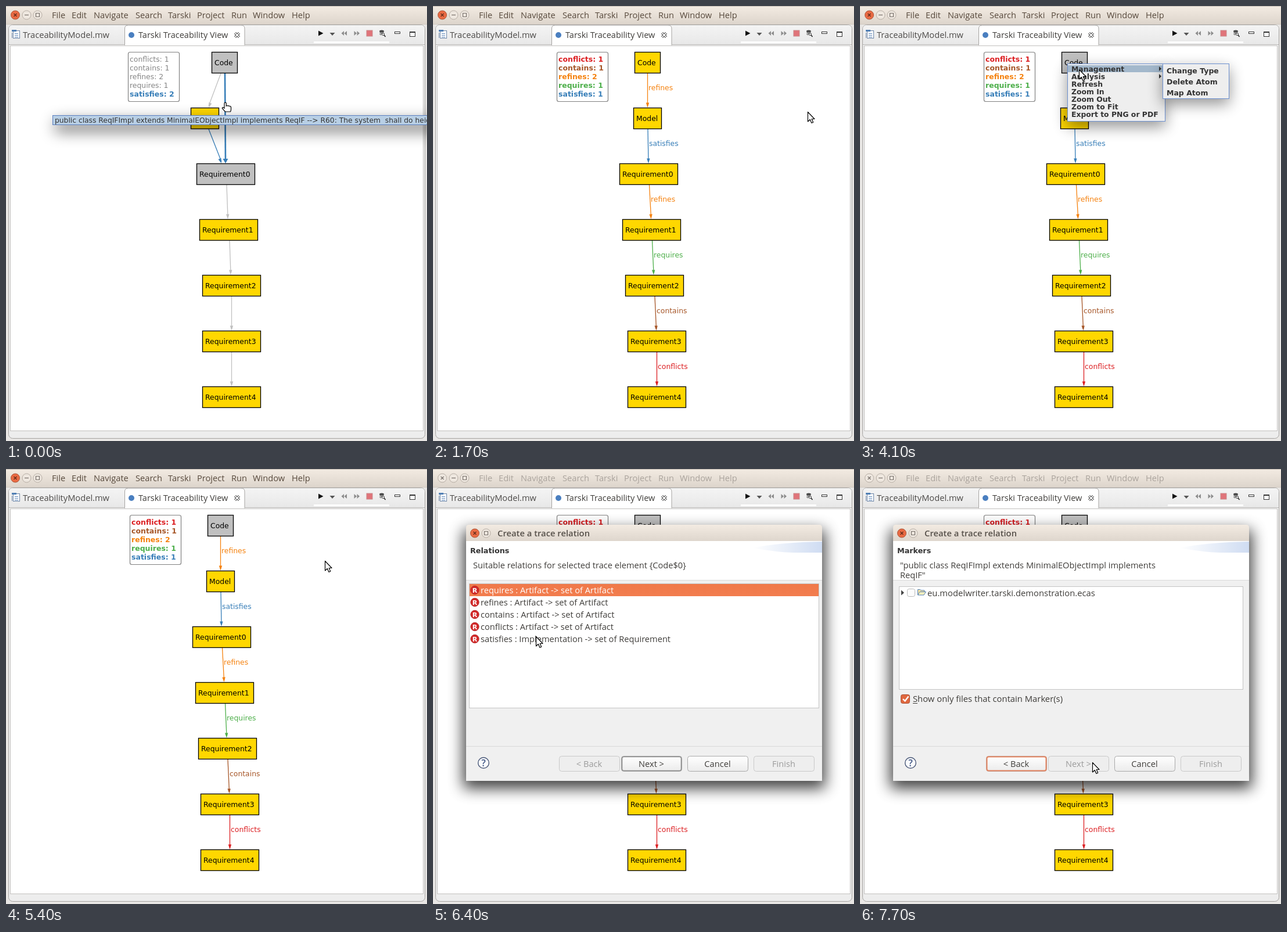
These frames come from a looping animation (725x749 px, 8000 ms). An HTML page:

```html
<!DOCTYPE html>
<html lang="en">
<head>
<meta charset="utf-8">
<title>Traceability view</title>
<style>
html, body { margin: 0; width: 100%; height: 100%; overflow: hidden; background: #e9e7e5; }
svg { display: block; width: 725px; height: 749px; }
text { white-space: pre; }
.dv { font: 12.4px "DejaVu Sans", sans-serif; }
.db { font: bold 12.5px "DejaVu Sans", sans-serif; }
.ui { font: 14.65px "Open Sans", "Noto Sans", sans-serif; }
.ti { font: 600 14.8px "Open Sans", "Noto Sans", sans-serif; }
.mid { text-anchor: middle; }
</style>
</head>
<body>
<svg id="stage" viewBox="0 0 725 749" xmlns="http://www.w3.org/2000/svg">
  <defs>
    <linearGradient id="bar" x2="0" y2="1"><stop stop-color="#f3ebe2"/><stop offset="1" stop-color="#ddd5cc"/></linearGradient>
    <linearGradient id="tabs" x2="0" y2="1"><stop stop-color="#f4f4f4"/><stop offset="1" stop-color="#e8e8e8"/></linearGradient>
    <linearGradient id="row" x2="0" y2="1"><stop stop-color="#f0794a"/><stop offset="1" stop-color="#f27d4e"/></linearGradient>
    <linearGradient id="btn" x2="0" y2="1"><stop stop-color="#ffffff"/><stop offset="1" stop-color="#ebebeb"/></linearGradient>
    <linearGradient id="sky"><stop stop-color="#fff"/><stop offset="1" stop-color="#cfdcf2"/></linearGradient>
    <filter id="soft" filterUnits="userSpaceOnUse" x="-80" y="0" width="980" height="749"><feGaussianBlur stdDeviation="13"/></filter>
  </defs>
</svg>
<script>
const NS = 'http://www.w3.org/2000/svg';
const stage = document.getElementById('stage');

function el(parent, tag, attrs) {
  const e = document.createElementNS(NS, tag);
  for (const k in attrs) e.setAttribute(k, attrs[k]);
  parent.appendChild(e);
  return e;
}
const group = (p, attrs = {}) => el(p, 'g', attrs);
const rect = (p, x, y, width, height, fill, more = {}) => el(p, 'rect', { x, y, width, height, fill, ...more });
const disc = (p, cx, cy, r, fill, more = {}) => el(p, 'circle', { cx, cy, r, fill, ...more });
const path = (p, d, stroke, more = {}) => el(p, 'path', { d, stroke, fill: 'none', ...more });
const fillPath = (p, d, fill, more = {}) => el(p, 'path', { d, fill, ...more });
function label(p, x, y, str, cls, fill, more = {}) {
  const e = el(p, 'text', { x, y, class: cls, fill, ...more });
  e.textContent = str;
  return e;
}
const show = (e, on) => e.setAttribute('display', on ? 'inline' : 'none');
const shadow = (p, x, y, w, h, opacity) =>
  rect(p, x, y + 9, w, h, '#000', { opacity, filter: 'url(#soft)' });

// ---- main window ----
const INK = '#3f3d3a';
const win = group(stage);
rect(win, 0, 0, 725, 749, '#e9e7e5');
rect(win, 0, 0, 725, 31, 'url(#bar)');
path(win, 'M0 .5H725', '#c4bbb2');
path(win, 'M0 31.5H725', '#d2cac2');

function ringButton(p, x, y, r, glyph, hot) {
  const g = group(p);
  disc(g, x, y, r, hot ? '#ea6a43' : '#eee7df', { stroke: hot ? '#a9553a' : '#b5aca3' });
  path(g, glyph, hot ? '#5b2a1b' : '#77706a', { 'stroke-width': 1.2 });
  return g;
}
const cross = (x, y, r) => `M${x - r} ${y - r}l${2 * r} ${2 * r}m0 ${-2 * r}l${-2 * r} ${2 * r}`;
const paleClose = ringButton(win, 16, 15.5, 7.5, cross(16, 15.5, 2.5), false);
const hotClose = ringButton(win, 16, 15.5, 7.5, cross(16, 15.5, 2.5), true);
ringButton(win, 35.5, 15.5, 7.5, 'M32 15.5h7', false);
ringButton(win, 54.5, 15.5, 7.5, 'M51.5 12.5h6v6h-6z', false);

const menuBar = group(win);
[['File', 79], ['Edit', 113], ['Navigate', 151], ['Search', 223], ['Tarski', 279],
 ['Project', 329], ['Run', 388], ['Window', 425], ['Help', 492]].forEach(([s, x]) =>
  label(menuBar, x, 21, s, 'ui', 'inherit', { 'font-weight': 500 }).removeAttribute('fill'));

rect(win, 4.5, 32.5, 717, 712, '#ededed', { rx: 7, stroke: '#a5a3a1' });
rect(win, 5, 33, 716, 33, 'url(#tabs)', { rx: 6 });
path(win, 'M5 66.5H721', '#b3b1af');
rect(win, 7.5, 68.5, 711, 663, '#fff', { stroke: '#c3c1bf' });
path(win, 'M5 67.5H721', '#fbfbfb');
fillPath(win, 'M204.500 67.500V39q0 -6 6 -6H405q6 0 6 6V67.500', '#fff', { stroke: '#a5a3a1' });

// document icon, view icon, tab close
rect(win, 12.5, 42.5, 11, 13, '#fff', { stroke: '#6c86a8' });
rect(win, 10, 41, 8, 3, '#4f7fb4');
path(win, 'M15 47.500h6m-6 3h6m-6 3h6', '#5d86b8');
path(win, 'M10.500 46v9', '#6c86a8');
label(win, 29, 55, 'TraceabilityModel.mw', 'ui', '#4c4a48');
disc(win, 216, 50, 5, '#4a7fc0');
label(win, 228, 55, 'Tarski Traceability View', 'ui', INK, { style: 'font-size:14.5px' });
path(win, cross(398, 50, 3.6), '#333', { 'stroke-width': 4 });
path(win, cross(398, 50, 3.6), '#fff', { 'stroke-width': 2 });

// toolbar
rect(win, 530, 61, 130, 3, '#fff');
fillPath(win, 'M538 42.500L546.500 47L538 51.500Z', '#111');
fillPath(win, 'M557.500 46H566.500L562 51Z', '#555');
fillPath(win, 'M582 43v8l-4.500 -4zm5 0v8l-4.500 -4z', '#8c8c8c');
fillPath(win, 'M599.500 43v8l4.500 -4zm5 0v8l4.500 -4z', '#8c8c8c');
rect(win, 621, 42, 10, 10, '#e0747a', { stroke: '#c98a8c' });
el(win, 'ellipse', { cx: 647, cy: 43.5, rx: 4, ry: 2, fill: '#444' });
path(win, 'M643.500 46q3.500 2 7 0m-7 2.500q2 1 3 1', '#444', { 'stroke-width': 1.3 });
disc(win, 649.5, 48.5, 2, '#fff', { stroke: '#222' });
path(win, 'M651 50l2.500 3', '#222', { 'stroke-width': 1.5 });
rect(win, 669.5, 44.500, 9, 3, '#fff', { stroke: '#333' });
rect(win, 695.5, 44.5, 9, 8, '#fff', { stroke: '#333' });
path(win, 'M695 45.500h10', '#333');

// ---- graph ----
const GOLD = '#ffd700', GREY = '#c0c0c0';
const HUES = { conflicts: '#dc1f22', contains: '#a65628', refines: '#f5820f', requires: '#4daf4a', satisfies: '#377eb8' };
const NAMES = ['Code', 'Model', 'Requirement0', 'Requirement1', 'Requirement2', 'Requirement3', 'Requirement4'];

function edge(p, x1, y1, x2, y2, color, wide = 1.3) {
  const a = Math.atan2(y2 - y1, x2 - x1) * 180 / Math.PI;
  const len = wide > 2 ? 8 : 8.5, half = wide > 2 ? 4.5 : 2.7;
  path(p, `M${x1} ${y1}L${x2} ${y2 - 3}`, color, { 'stroke-width': wide });
  fillPath(p, `M0 0L${-len} ${-half}V${half}Z`, color, { transform: `translate(${x2} ${y2}) rotate(${a})` });
}
function nodes(p, xs, greys) {
  return xs.map((x, i) => {
    const y = 79.5 + 96 * i, w = i == 0 ? 44 : i == 1 ? 48 : 100;
    const box = rect(p, x + .5, y, w, 36, greys.includes(i) ? GREY : GOLD, { stroke: '#000', 'stroke-width': 1.3 });
    label(p, x + 5, y + 22.5, NAMES[i], 'dv', '#000');
    return box;
  });
}
function legend(p, x, counts, only) {
  rect(p, x + .5, 79.5, 88, 85, '#fff', { rx: 3, stroke: '#808080', 'stroke-width': 1.2 });
  Object.keys(HUES).forEach((k, i) => {
    const on = !only || only == k;
    label(p, x + 3, 96 + 15 * i, `${k}: ${counts[i]}`, on ? 'db' : 'dv', on ? HUES[k] : '#858585');
  });
}

const before = group(stage);
legend(before, 210, [1, 1, 2, 1, 2], 'satisfies');
[[370, 116, 349, 175], [380, 308, 382, 367], [385, 404, 387, 463], [388.5, 500, 388.5, 559], [388.5, 596, 388.5, 655]]
  .forEach(([a, b, c, d]) => edge(before, a, b, c, d, GREY));
edge(before, 349, 212, 371, 271, HUES.satisfies);
edge(before, 377, 116, 378, 271, HUES.satisfies, 2.6);
nodes(before, [354, 318, 328, 333, 338, 338, 338], [0, 2]);

const after = group(stage);
legend(after, 213, [1, 1, 2, 1, 1]);
[['refines', 369.5, 369.5, 371], ['satisfies', 370, 371, 372], ['refines', 372.5, 375.5, 375],
 ['requires', 377.5, 380, 380], ['contains', 382, 384.5, 385], ['conflicts', 385.5, 385.5, 387]]
  .forEach(([k, x1, x2, lx], i) => {
    edge(after, x1, 116 + 96 * i, x2, 175 + 96 * i, HUES[k]);
    label(after, lx, 145 + 96 * i, k, 'dv', HUES[k]);
  });
const codeBox = nodes(after, [347, 345, 321, 326, 331, 335, 335], [])[0];

// ---- tooltip ----
const tip = group(stage);
shadow(tip, 84, 188, 680, 20, .5);
rect(tip, 80.5, 188.5, 700, 16, '#b8cfe5', { stroke: '#5b7fc0' });
label(tip, 84, 201, 'public class ReqIFImpl extends MinimalEObjectImpl implements ReqIF --> R60: The system  shall do height',
  'dv', '#333', { style: 'font-size:12.3px' });

// ---- popup menus ----
const ITEMS = ['Management', 'Analysis', 'Refresh', 'Zoom In', 'Zoom Out', 'Zoom to Fit', 'Export to PNG or PDF'];
function panel(p, x, y, w, h) {
  shadow(p, x, y, w, h, .42);
  rect(p, x + .5, y + .5, w - 1, h - 1, '#eee', { stroke: '#6b8fd0' });
}
function popup(x, y, subItems, subWidth) {
  const main = group(stage), sub = group(stage);
  panel(main, x, y, 169, 100);
  const mark = rect(main, x + 1, y + 3, 167, 12, '#a3b8cc');
  ITEMS.forEach((s, i) => {
    label(main, x + 7, y + 14 + 13 * i, s, 'db', '#333', { style: 'font-size:12.4px' });
    if (i < 2) fillPath(main, `M${x + 158} ${y + 5 + 13 * i}l4 4l-4 4z`, '#333');
  });
  const h = 19 * subItems.length + 4;
  panel(sub, x + 164, y, subWidth, h);
  const subMark = rect(sub, x + 165, y + 2, subWidth - 2, 19, '#a3b8cc');
  subItems.forEach((s, i) => label(sub, x + 171, y + 17 + 19 * i, s, 'db', '#333'));
  return (open, marked, subOpen, pick) => {
    show(main, open);
    show(mark, marked);
    show(sub, subOpen);
    show(subMark, pick >= 0);
    subMark.setAttribute('y', y + 2 + 19 * Math.max(pick, 0));
  };
}
const edgeMenu = popup(378, 179, ['Delete Relation'], 135);
const nodeMenu = popup(357, 99, ['Change Type', 'Delete Atom', 'Map Atom'], 115);

// ---- dialog ----
const dialog = group(stage);
shadow(dialog, 52, 96, 623, 445, .75);
rect(dialog, 57, 102, 613, 435, '#f0f0f0');
fillPath(dialog, 'M57 125V101q0 -5 5 -5H665q5 0 5 5V125Z', 'url(#bar)');
ringButton(dialog, 72, 110.5, 7.5, cross(72, 110.5, 2.5), true);
ringButton(dialog, 91.5, 110.5, 7.5, 'M88.500 107.500h6v6h-6z', false);
label(dialog, 111, 116, 'Create a trace relation', 'ti', '#56504a');
rect(dialog, 57, 124, 613, 67, '#fff');
fillPath(dialog, 'M550 136Q600 126 670 125V144H620Q590 143 550 136Z', 'url(#sky)');
path(dialog, 'M57 191.500H670M57 477.500H670', '#d9d9d9');
disc(dialog, 87, 506, 9.3, '#fafbfd', { stroke: '#4a5878', 'stroke-width': 1.4 });
label(dialog, 87, 511.5, '?', 'ti mid', '#3f5585', { style: 'font-size:16px' });

function button(p, x, str, state) {
  const off = state == 'off';
  rect(p, x + .5, 494.5, 104, 26, off ? '#eeeeee' : 'url(#btn)', { rx: 4, stroke: off ? '#c9c9c9' : '#a9a9a9' });
  if (state == 'default') rect(p, x + 1.5, 495.5, 102, 24, 'none', { rx: 3, stroke: '#8d8d8d', 'stroke-width': 1.6 });
  if (state == 'focus') rect(p, x + 1.5, 495.5, 102, 24, 'none', { rx: 3, stroke: '#e58460', 'stroke-width': 2 });
  label(p, x + 52, 513, str, 'ui mid', off ? '#9b9b9b' : INK);
}
button(dialog, 438, 'Cancel');
button(dialog, 552, 'Finish', 'off');

const page1 = group(dialog);
label(page1, 64, 145, 'Relations', 'db', '#333', { style: 'font-size:12.75px' });
label(page1, 69, 171, 'Suitable relations for selected trace element {Code$0}', 'ui', INK);
rect(page1, 62.5, 197.5, 602, 214, '#fff', { stroke: '#c4c4c4' });
const rowMark = rect(page1, 63, 198, 601, 21, 'url(#row)');
const rows = ['requires : Artifact', 'refines : Artifact', 'contains : Artifact', 'conflicts : Artifact', 'satisfies : Implementation']
  .map((s, i) => {
    const y = 208.5 + 21 * i;
    disc(page1, 72, y, 7.2, '#d42a2a', { stroke: '#a81e1e', 'stroke-width': .8 });
    label(page1, 72, y + 4, 'R', 'db mid', '#fff', { style: 'font-size:11px' });
    return label(page1, 82, y + 5.5, s + ' -> set of ' + (i < 4 ? 'Artifact' : 'Requirement'), 'ui', INK);
  });
button(page1, 217, '< Back', 'off');
button(page1, 324, 'Next >', 'default');

const page2 = group(dialog);
label(page2, 64, 145, 'Markers', 'db', '#333', { style: 'font-size:12.75px' });
label(page2, 69, 171, '"public class ReqIFImpl extends MinimalEObjectImpl implements', 'ui', INK);
label(page2, 69, 188, 'ReqIF"', 'ui', INK);
rect(page2, 67.5, 202.5, 592, 177, '#fff', { stroke: '#c4c4c4' });
fillPath(page2, 'M71 208.500L76 213L71 217.500Z', '#444');
rect(page2, 81.5, 206.5, 13, 13, '#fdfdfd', { rx: 3, stroke: '#b9b9b9' });
fillPath(page2, 'M99.500 217V207.500h4l1.500 1.500h6v3', '#f7e2a0', { stroke: '#4d7db5' });
fillPath(page2, 'M99.500 217L103 211.500H113.500L110 217Z', '#fff0bd', { stroke: '#4d7db5' });
label(page2, 116, 219, 'eu.modelwriter.tarski.demonstration.ecas', 'ui', INK, { style: 'font-size:14.8px' });
rect(page2, 70.5, 388.5, 15, 15, '#e0683f', { rx: 3, stroke: '#a9553a' });
path(page2, 'M74 396l3.500 3.500l6 -8', '#fff', { 'stroke-width': 2.4 });
label(page2, 91, 401, 'Show only files that contain Marker(s)', 'ui', INK, { style: 'font-size:14.8px' });
path(page2, 'M91 403.500h8', INK);
button(page2, 217, '< Back', 'focus');
button(page2, 324, 'Next >', 'off');

// ---- pointers ----
const hand = fillPath(stage,
  'M376 176V168q0 -1.800 1.700 -1.800q1.600 0 1.600 1.800V172q1 -1 2.400 0q1.300 -.800 2.400 .400q3.400 -.400 3.400 2.600V178q0 2 -1 4H377.500L372.500 176.500q-.500 -2.200 1.500 -2Z',
  '#fff', { stroke: '#000', 'stroke-width': 1.2 });
path(hand.parentNode, '', 'none');
const arrow = fillPath(stage, 'M.5 .5V17L4.300 13.500L7 19.500L9.700 18.300L7.200 12.500H12Z', '#fff',
  { stroke: '#000', 'stroke-width': 1.2, 'stroke-linejoin': 'round' });

// time, x, y
const TRACK = [
  [0, 377, 177], [600, 377, 177], [700, 392, 184], [1300, 645, 182],
  [2100, 645, 182], [2900, 356, 97], [3700, 356, 97], [4100, 377, 109], [4400, 549, 112],
  [4500, 549, 112], [4700, 549, 155], [5300, 549, 155], [5400, 549, 158],
  [6200, 197, 246], [6400, 177, 288], [6900, 177, 288], [7600, 400, 505], [8000, 400, 505]
];
function pointer(t) {
  const i = Math.max(1, TRACK.findIndex(k => k[0] >= t));
  const [t0, x0, y0] = TRACK[i - 1], [t1, x1, y1] = TRACK[i];
  let u = (t - t0) / (t1 - t0);
  if (t1 - t0 > 500) u = u * u * (3 - 2 * u);
  return [x0 + (x1 - x0) * u, y0 + (y1 - y0) * u];
}

function draw(time) {
  const t = Math.floor(time / 100) * 100;
  const [x, y] = pointer(t);
  arrow.setAttribute('transform', `translate(${x.toFixed(1)} ${y.toFixed(1)})`);
  show(hand, t < 200);
  show(arrow, t >= 200);
  show(before, t < 1700);
  show(after, t >= 1700);
  show(tip, t < 200);
  codeBox.setAttribute('fill', t >= 2200 && x < 391 || t >= 2900 ? GREY : GOLD);

  edgeMenu(t >= 300 && t < 1700, t >= 700, t >= 900 && t < 1700, x > 542 ? 0 : -1);
  const pick = x < 521 ? -1 : y < 120 ? 0 : y < 139 ? 1 : 2;
  nodeMenu(t >= 3400 && t < 5000, t >= 3800, t >= 4000 && t < 5000, pick);

  const modal = t >= 5500;
  show(dialog, modal);
  dialog.setAttribute('opacity', t < 5600 ? .5 : 1);
  show(hotClose, !modal);
  show(paleClose, modal);
  menuBar.setAttribute('fill', modal ? '#aaa39c' : '#57493c');
  const row = t >= 6700 ? 4 : 0;
  rowMark.setAttribute('y', 198 + 21 * row);
  rows.forEach((r, i) => r.setAttribute('fill', i == row ? '#fff' : INK));
  show(page1, t < 7700);
  show(page2, t >= 7700);
}

const start = performance.now();
function tick() {
  draw((performance.now() - start) % 8000);
  requestAnimationFrame(tick);
}
draw(0);
requestAnimationFrame(tick);
</script>
</body>
</html>
```
